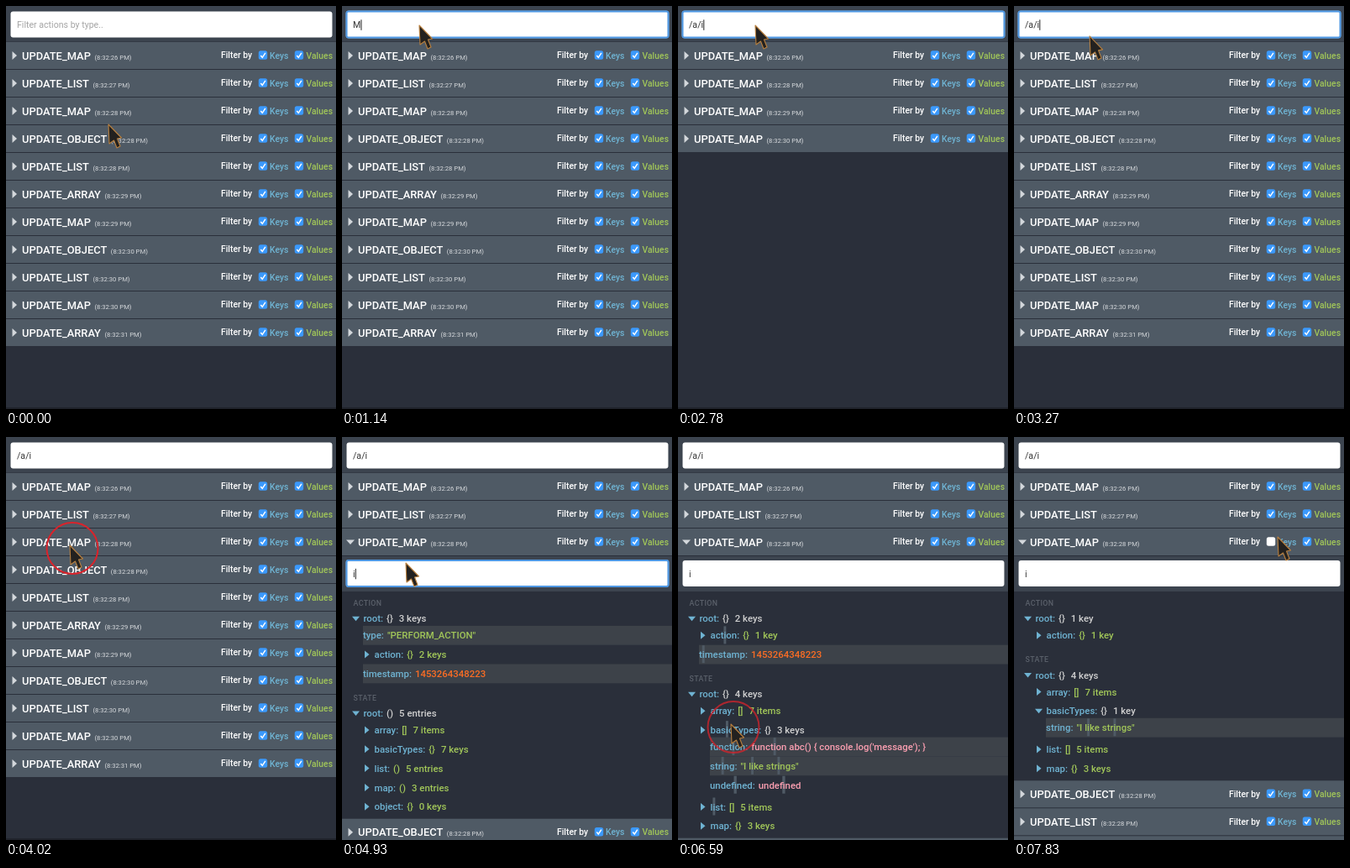
An HTML page that plays this animation: 393x480 px, repeating every 8 s.

```html
<!DOCTYPE html>
<html>
<head>
<meta charset="utf-8">
<style>
html, body { margin: 0; width: 100%; height: 100%; overflow: hidden; background: #2a2f3a; }
svg { display: block; position: absolute; left: 0; top: 0; font-family: Roboto, "Open Sans", sans-serif; }
</style>
</head>
<body>
<svg width="393" height="480" viewBox="0 0 393 480">
  <g id="page"></g>
  <circle id="ring" r="30.5" fill="none" stroke="#d9232b" stroke-width="2"/>
  <path id="mouse" d="M0 0L15.5 16L10.5 17L14 26L10 28L6.5 19L1 23Z" fill="#23211f" stroke="#b9803f" stroke-width="1.1" stroke-linejoin="round"/>
</svg>
<script>
const LOOP = 8000, STEP = 135;
const DARK = '#2a2f3a', STRIP = '#3c444f', ROW = '#4f5a65', BAND = '#3d4249';
const GREY = '#d0d0d0', BLUE = '#6fb3d2', GREEN = '#a1c659', ORANGE = '#fc6d24', PINK = '#fb9fb1';
const $ = id => document.getElementById(id);
const page = $('page'), ring = $('ring'), mouse = $('mouse');

const actions = [
  ['MAP', 26], ['LIST', 27], ['MAP', 28], ['OBJECT', 28], ['LIST', 28], ['ARRAY', 29],
  ['MAP', 29], ['OBJECT', 30], ['LIST', 30], ['MAP', 30], ['ARRAY', 31]
];

// Timeline: [time, value], the latest one counts
const typed = [[0, ''], [1140, 'M'], [1400, 'MAP'], [2070, ''], [2250, '/'], [2400, '/a'], [2600, '/a/'], [2780, '/a/i']];
const focus = [[0, ''], [620, 'top'], [4020, ''], [4540, 'inner'], [6440, '']];
const tree = [[0, ''], [4150, 'full'], [5480, 'shut'], [6590, 'opening'], [6740, 'open'], [7670, 'values']];
const moves = [[100, 400, 92, 23], [3270, 620, 76, 129], [4410, 130, 76, 150], [5870, 570, 63, 342], [6740, 640, 314, 119]];
const clicks = [[620, 270], [4020, 260], [4540, 260], [6440, 300], [7520, 310]];
const at = (list, t) => list.filter(e => e[0] <= t).pop()[1];

const rect = (x, y, w, h, fill, more = '') =>
  `<rect x="${x}" y="${y}" width="${w}" height="${h}" fill="${fill}" ${more}/>`;
const text = (x, y, size, fill, s, more = '') =>
  `<text x="${x}" y="${y + size * .36}" font-size="${size}" fill="${fill}" ${more}>${s}</text>`;
const span = (dx, fill, s) => `<tspan dx="${dx}" fill="${fill}">${s}</tspan>`;
const arrow = (x, y, down, fill, r) =>
  `<path d="M-2.5 ${-r}L3 0L-2.5 ${r}Z" fill="${fill}" transform="translate(${x} ${y}) rotate(${down ? 90 : 0})"/>`;
const medium = 'font-weight="500"';

function field(y, value, hint, focused) {
  const glow = focused
    ? rect(4.5, y - 1, 385, 33, '#8cbdec', 'rx="4"') + rect(5.5, y, 383, 31, '#fff', 'rx="2" stroke="#4f98e3" stroke-width="2"')
    : rect(5.5, y, 383, 31, '#fff', 'rx="3"');
  const caret = focused ? '<tspan class="caret"></tspan>' : '';
  return glow + text(13, y + 16, 10.6, value ? '#333' : '#a4a4a4', value || hint, focused ? `data-caret="${value.length}"` : '') + caret;
}

function check(x, y, on) {
  return rect(x, y - 5.2, 10.4, 10.4, on ? '#3b99fc' : '#fff', 'rx="2.5"') +
    (on ? `<path d="M${x + 2.5} ${y + .4}l2 2.4l3.6-5.4" fill="none" stroke="#fff" stroke-width="1.5"/>` : '');
}

function row([name, sec], y, open, keysOn) {
  const c = y + 16;
  return rect(0, y, 393, 32, ROW) + arrow(10, c, open, '#d3d7db', 5) +
    text(19, c, 12.9, '#fff', 'UPDATE_' + name + `<tspan dx="4.5" font-size="7.7" font-weight="400" fill="#d8dbde">(8:32:${sec} PM)</tspan>`, medium) +
    text(256, c - .3, 10.4, '#fff', 'Filter by', medium) +
    check(300.8, c - .5, keysOn) + text(314, c, 10.4, BLUE, 'Keys', medium) +
    check(343.8, c - .5, true) + text(357.5, c, 10.4, GREEN, 'Values', medium);
}

const shut = (key, sign, count) => ({ key, sign, value: count, color: GREEN });
const open = (key, sign, count, kids, turned = true) => ({ key, sign, value: count, color: GREY, kids, turned });
const leaf = (key, value, color, band = true) => ({ key, value, color, band });

function treeData(mode) {
  const stamp = leaf('timestamp', '1453264348223', ORANGE);
  if (mode === 'full') return [
    open('root', '{}', '3 keys', [leaf('type', '"PERFORM_ACTION"', GREEN), shut('action', '{}', '2 keys'), stamp]),
    open('root', '()', '5 entries', [shut('array', '[]', '7 items'), shut('basicTypes', '{}', '7 keys'),
      shut('list', '()', '5 entries'), shut('map', '()', '3 entries'), shut('object', '{}', '0 keys')])
  ];
  const values = mode === 'values';
  const string = leaf('string', '"I like strings"', GREEN);
  const kids = values ? [string] : [
    leaf('function', "function abc() { console.log('message'); }", PINK), string,
    leaf('undefined', 'undefined', PINK, false)
  ];
  const basic = mode === 'shut' ? shut('basicTypes', '{}', '3 keys')
    : open('basicTypes', '{}', values ? '1 key' : '3 keys', kids, mode !== 'opening');
  const action = shut('action', '{}', '1 key');
  return [
    open('root', '{}', values ? '1 key' : '2 keys', values ? [action] : [action, stamp]),
    open('root', '{}', '4 keys', [shut('array', '[]', '7 items'), basic, shut('list', '[]', '5 items'), shut('map', '{}', '3 keys')])
  ];
}

// Draws a node and its children around the centre line y, returns the next y
function node(n, depth, y, mode, out) {
  const x = n.sign ? 25.5 + 13 * depth : 12 + 13 * depth;
  const from = mode === 'values' ? n.key.length : 0;
  const to = n.key.length + 1 + (n.sign ? 0 : n.value.length);
  if (n.band) out.push(rect(x, y - 11.4, 393 - x, 22.8, BAND));
  if (n.sign) out.push(arrow(x - 9, y, n.turned, BLUE, 4.5));
  out.push(text(x, y, 11.4, BLUE,
    n.key + ':' + (n.sign ? span(4, n.color, n.sign) + span(7, n.color, n.value) : span(4, n.color, n.value)),
    medium + (mode === 'full' ? '' : ` data-from="${from}" data-to="${to}"`)));
  if (!n.kids) return y + 22.8;
  y += 20;
  for (const kid of n.kids) y = node(kid, depth + 1, y, mode, out);
  return depth ? y + 3 : y;
}

function details(y, mode, value, focused) {
  const out = [rect(0, y, 393, 42, STRIP), field(y + 5, value, 'Search..', focused)];
  y += 56;
  treeData(mode).forEach((root, i) => {
    out.push(text(13.5, y, 8.8, '#5b616b', i ? 'STATE' : 'ACTION', 'letter-spacing=".4" ' + medium));
    y = node(root, 0, y + 18.3, mode, out) + 6;
  });
  return [out.join(''), y - 14.3];
}

function draw(value, focused, mode, inner, onlyMaps) {
  let y = 43, html = rect(0, 478, 393, 2, '#20232b') + rect(0, 0, 393, 42.5, STRIP) +
    field(6.5, value, 'Filter actions by type..', focused === 'top');
  actions.forEach((a, i) => {
    if (onlyMaps && a[0] !== 'MAP') return;
    const expanded = i === 2 && mode;
    html += row(a, y, expanded, !(expanded && mode === 'values'));
    y += 33;
    if (expanded) {
      const [body, next] = details(y, mode, inner, focused === 'inner');
      html += rect(0, y, 393, next - y, DARK) + body;
      y = next;
    }
  });
  page.innerHTML = html;
  decorate();
}

const bar = (before, x, y, w, h, fill) => {
  const r = document.createElementNS('http://www.w3.org/2000/svg', 'rect');
  for (const [k, v] of Object.entries({ x, y, width: w, height: h, fill })) r.setAttribute(k, v);
  before.parentNode.insertBefore(r, before);
};

// Text caret and the marks behind matching letters
function decorate() {
  for (const el of page.querySelectorAll('[data-caret]')) {
    const n = +el.dataset.caret;
    const x = n ? el.getEndPositionOfChar(n - 1).x : 13;
    bar(el, x + .2, +el.getAttribute('y') - 10, 1, 12.5, '#222');
  }
  for (const el of page.querySelectorAll('[data-from]')) {
    for (let i = +el.dataset.from; i < +el.dataset.to; i++) {
      if (el.textContent[i] !== 'i') continue;
      const box = el.getExtentOfChar(i);
      bar(el, box.x, +el.getAttribute('y') - 15, box.width, 21, ROW);
    }
  }
}

function mouseAt(t) {
  let x = 122, y = 141;
  for (const [start, span, toX, toY] of moves) {
    if (t < start) break;
    const p = Math.min(1, (Math.floor((t - start) / STEP) + 1) * STEP / span);
    const e = p * p * (3 - 2 * p);
    x += (toX - x) * e;
    y += (toY - y) * e;
  }
  return [x, y];
}

let last = '';
function frame(now) {
  const t = now % LOOP;
  const state = [at(typed, t), at(focus, t), at(tree, t), t >= 4930 ? 'i' : '', t >= 1400 && t < 3010];
  const key = state.join('|');
  if (key !== last) {
    draw(...state);
    last = key;
  }
  const [x, y] = mouseAt(t);
  mouse.setAttribute('transform', `translate(${x} ${y})`);
  const click = clicks.find(([start, span]) => t >= start && t < start + span);
  ring.setAttribute('cx', x + 3);
  ring.setAttribute('cy', y + 3.5);
  ring.setAttribute('opacity', !click ? 0 : t - click[0] < 130 ? 1 : .75);
  requestAnimationFrame(frame);
}
frame(0);
</script>
</body>
</html>
```
